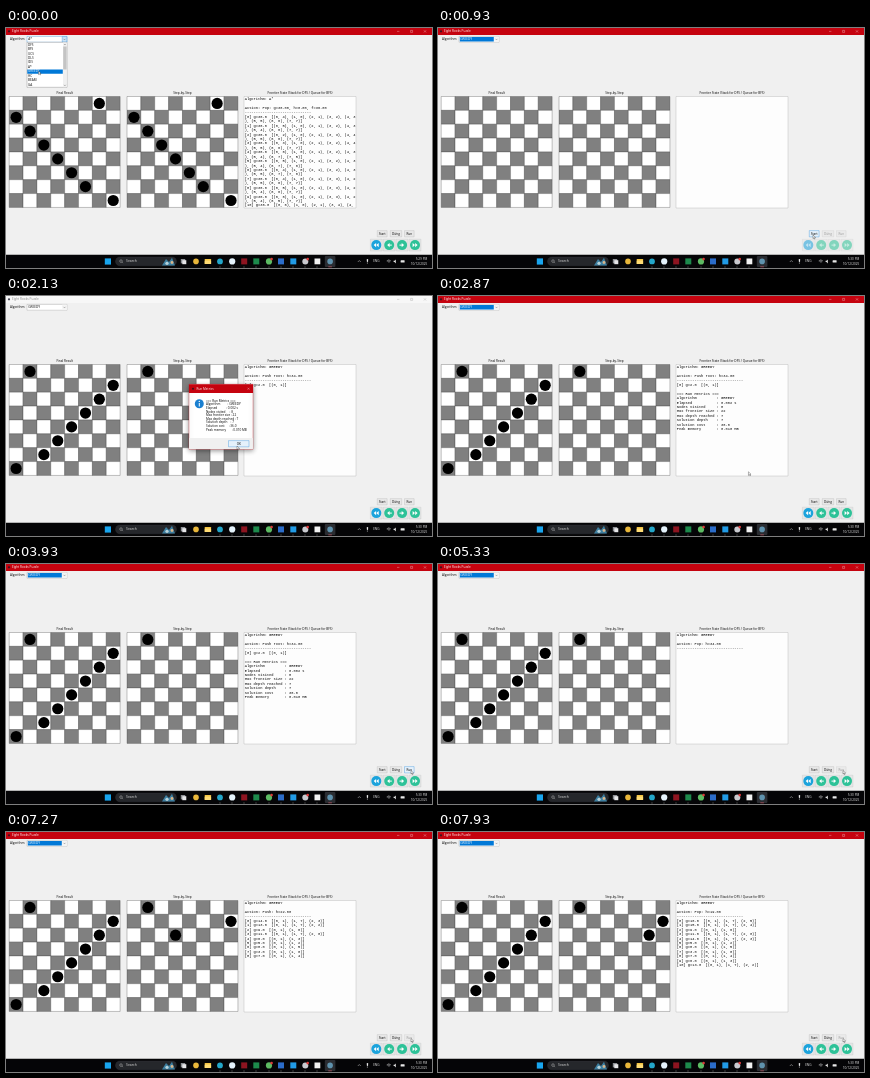
These frames come from a looping animation (426x240 px, 8 s). An HTML page with a canvas:

```html
<!DOCTYPE html>
<html lang="en">
<head>
<meta charset="utf-8">
<title>Eight Rooks Puzzle</title>
<style>
html, body { margin: 0; width: 100%; height: 100%; overflow: hidden; background: #f0f0f0; }
canvas { display: block; width: 426px; height: 240px; }
</style>
</head>
<body>
<canvas id="stage"></canvas>
<script>
const W = 426, H = 240, LOOP = 8000, UNIT = W / 1920;
const SANS = '"Open Sans", "Noto Sans", sans-serif';
const MONO = '"Liberation Mono", monospace';
const RED = '#c5030f', BLUE = '#0078d7', GREY = '#808080', FACE = '#f0f0f0';
const CELL = 62.5 * UNIT, BOARD_Y = 68.5;

// Moments at which the screen changes, in ms
const SELECT = 170, MINUTE = 500, START = 1130, CLOSE = 2370, RUN = 5235, STEP = 174;

const canvas = document.getElementById('stage');
const ratio = window.devicePixelRatio || 1;
canvas.width = W * ratio;
canvas.height = H * ratio;
const ctx = canvas.getContext('2d');

// ---------- drawing helpers (stage pixels; font sizes in desktop pixels) ----------
function rect(x, y, w, h, fill, stroke, radius = 0) {
  ctx.beginPath();
  ctx.roundRect(x, y, w, h, radius);
  if (fill) { ctx.fillStyle = fill; ctx.fill(); }
  if (stroke) { ctx.strokeStyle = stroke; ctx.lineWidth = 0.3; ctx.stroke(); }
}
function disc(x, y, r, fill) {
  ctx.beginPath();
  ctx.arc(x, y, r, 0, 7);
  ctx.fillStyle = fill;
  ctx.fill();
}
function poly(points, fill) {
  ctx.beginPath();
  points.forEach(([x, y]) => ctx.lineTo(x, y));
  ctx.closePath();
  ctx.fillStyle = fill;
  ctx.fill();
}
function line(points, color, width = 0.4) {
  ctx.beginPath();
  points.forEach(([x, y], i) => i ? ctx.lineTo(x, y) : ctx.moveTo(x, y));
  ctx.strokeStyle = color;
  ctx.lineWidth = width;
  ctx.stroke();
}
function text(str, x, y, color = '#000', align = 'left', size = 14, family = SANS) {
  ctx.save();
  ctx.translate(x, y);
  ctx.scale(UNIT, UNIT);
  ctx.font = `${size}px ${family}`;
  ctx.textAlign = align;
  ctx.textBaseline = 'middle';
  ctx.fillStyle = color;
  ctx.fillText(str, 0, 0);
  ctx.restore();
}
function cross(x, y, r, color) {
  line([[x - r, y - r], [x + r, y + r]], color, 0.3);
  line([[x + r, y - r], [x - r, y + r]], color, 0.3);
}

// ---------- greedy search: a state is the list of columns, row by row ----------
const cost = cols => cols.reduce((sum, c) => sum + c + 1, 0);
const estimate = cols => 36 - cost(cols);
const describe = (cols, i) =>
  `[${i}] g=${cost(cols).toFixed(1)}  [${cols.map((c, r) => `(${r}, ${c})`).join(', ')}]`;

function push(heap, item) {
  let i = heap.push(item) - 1;
  while (i) {
    const up = (i - 1) >> 1;
    if (estimate(heap[up]) <= estimate(heap[i])) break;
    [heap[up], heap[i]] = [heap[i], heap[up]];
    i = up;
  }
}
function pop(heap) {
  const top = heap[0], last = heap.pop();
  if (!heap.length) return top;
  heap[0] = last;
  for (let i = 0, kid; (kid = 2 * i + 1) < heap.length; i = kid) {
    if (kid + 1 < heap.length && estimate(heap[kid + 1]) < estimate(heap[kid])) kid++;
    if (estimate(heap[i]) <= estimate(heap[kid])) break;
    [heap[i], heap[kid]] = [heap[kid], heap[i]];
  }
  return top;
}
function greedySteps(count) {
  const steps = [], heap = [[1]];
  const record = (verb, cols) => steps.push({
    cols,
    lines: report('GREEDY', `${verb}: h=${estimate(cols).toFixed(2)}`, heap)
  });
  while (steps.length < count) {
    const state = pop(heap);
    record('Pop', state);
    for (let c = 0; c < 8; c++) {
      if (state.includes(c)) continue;
      push(heap, [...state, c]);
      record('Push', [...state, c]);
    }
  }
  return steps;
}
function report(algorithm, action, frontier) {
  return [`Algorithm: ${algorithm}`, '', `Action: ${action}`, '-'.repeat(30),
    ...frontier.map(describe)].flatMap(s => s.match(/.{1,50}/g) || ['']);
}

const columns = str => [...str].map(Number);
const STAR_RESULT = columns('60123457'), GREEDY_RESULT = columns('17654320');
const STAR_LINES = report('A*', 'Pop: g=36.00, h=0.00, f=36.00',
  ['40123567', '50123467', '20134567', '30124567', '60123475', '50123476',
   '40123576', '40132567', '50132467', '60132457', '60142357'].map(columns));
const METRICS = ['=== Run Metrics ===', ...[
  ['Algorithm', 'GREEDY'], ['Elapsed', '0.002 s'], ['Nodes visited', '8'],
  ['Max frontier size', '22'], ['Max depth reached', '7'], ['Solution depth', '7'],
  ['Solution cost', '36.0'], ['Peak memory', '0.010 MB']
].map(([name, value]) => `${name.padEnd(18)}: ${value}`)];
const ROOT_LINES = report('GREEDY', 'Push root: h=34.00', [[1]]);
const STEPS = greedySteps(16);

function stateAt(t) {
  if (t < SELECT) return { result: STAR_RESULT, cols: STAR_RESULT, lines: STAR_LINES };
  if (t < START) return { result: [], cols: [], lines: [] };
  if (t < CLOSE) return { result: GREEDY_RESULT, cols: [1], lines: ROOT_LINES };
  if (t < RUN) return { result: GREEDY_RESULT, cols: [1], lines: [...ROOT_LINES, '', ...METRICS] };
  return { result: GREEDY_RESULT, ...STEPS[Math.floor((t - RUN) / STEP)] };
}

// ---------- window ----------
function drawTitleBar(active) {
  const ink = active ? '#fff' : '#888';
  rect(0, 0, W, 7, active ? RED : '#f7f7f7');
  disc(3, 3.3, 1.1, active ? '#3a1420' : '#445');
  text('Eight Rooks Puzzle', 6, 3.4, ink);
  line([[391, 3.4], [393.4, 3.4]], ink, 0.3);
  rect(404.6, 2.4, 2, 2, null, ink);
  cross(419, 3.4, 1.1, ink);
}

function drawCombo(value, focused, open) {
  text('Algorithm:', 4, 11.4);
  rect(21, 8.4, 40, 5.8, '#fff', open ? BLUE : '#888');
  if (focused) rect(21.8, 9, 34, 4.6, BLUE);
  text(value, 22.3, 11.4, focused ? '#fff' : '#000');
  rect(56.2, 8.6, 4.6, 5.4, open ? '#cce4f7' : '#f4f4f4', open ? BLUE : null);
  line([[57.5, 10.8], [58.5, 11.9], [59.5, 10.8]], '#444', 0.35);
}

function drawOptions() {
  rect(21, 14.3, 40, 45, '#fff', '#555');
  ['DFS', 'BFS', 'UCS', 'DLS', 'IDS', 'A*', 'GREEDY', 'HC', 'BEAM', 'GA'].forEach((name, i) => {
    const y = 16.8 + i * 4.47, hot = name === 'GREEDY';
    if (hot) rect(21.3, y - 2.2, 35.5, 4.4, BLUE);
    text(name, 22, y, hot ? '#fff' : '#000');
  });
  rect(57, 14.5, 3.8, 44.6, '#f0f0f0');
  rect(57.2, 18.5, 3.4, 23, '#c4c4c4');
  line([[58, 17], [58.9, 16], [59.8, 17]], '#555');
  line([[58, 56.8], [58.9, 57.8], [59.8, 56.8]], '#555');
}

function drawBoard(x, title, rooks) {
  text(title, x + CELL * 4, 65.3, '#000', 'center');
  for (let r = 0; r < 8; r++)
    for (let c = 0; c < 8; c++)
      rect(x + c * CELL, BOARD_Y + r * CELL, CELL, CELL, (r + c) % 2 ? GREY : '#fff', '#333');
  rooks.forEach((c, r) => disc(x + (c + 0.5) * CELL, BOARD_Y + (r + 0.5) * CELL, 5.6, '#000'));
}

function drawFrontier(lines) {
  text('Frontier State (Stack for DFS / Queue for BFS)', 294, 65.3, '#000', 'center');
  rect(238, 68.5, 112, 111.5, '#fdfdfd', '#999');
  lines.slice(0, 25).forEach((s, i) => text(s, 238.7, 71.2 + i * 4.43, '#000', 'left', 16.67, MONO));
}

function drawButtons(t) {
  const ready = t < SELECT || t >= START;
  const button = (label, x, w, enabled, hot) => {
    rect(x, 202.6, w, 6.3, hot ? '#e5f1fb' : enabled ? '#e8e8e8' : '#eaeaea',
      hot ? BLUE : enabled ? '#aaa' : '#c8c8c8');
    text(label, x + w / 2, 205.8, enabled ? '#000' : '#999', 'center');
  };
  button('Start', 371.3, 9.8, true, t > 850 && t < START);
  button('Dừng', 384.3, 11.4, ready);
  button('Run', 398.5, 9.6, ready && t < RUN, t > 3350 && t < RUN);

  ctx.globalAlpha = ready ? 1 : 0.55;
  [[370.3, -1, 2], [383.2, -1, 1], [396.1, 1, 1], [409, 1, 2]].forEach(([x, dir, arrows], i) => {
    rect(x - 5.9, 211.2, 11.8, 11.8, '#e4e6e6', '#bbb');
    disc(x, 217.1, 5, i ? '#2dc298' : '#1ba3dc');
    for (let k = 0; k < arrows; k++) {
      const tip = x + dir * (arrows === 2 ? k * 2.6 : 2);
      poly([[tip, 217.1], [tip - dir * 2.4, 215], [tip - dir * 2.4, 219.2]], '#fff');
    }
    if (arrows === 1) rect(x - (dir > 0 ? 2.6 : 0), 216.6, 2.6, 1, '#fff');
  });
  ctx.globalAlpha = 1;
}

function drawDialog() {
  ctx.save();
  ctx.shadowColor = 'rgba(0,0,0,.45)';
  ctx.shadowBlur = 5 * ratio;
  ctx.shadowOffsetY = 1.5 * ratio;
  rect(183, 88.3, 64, 65, '#fff', RED);
  ctx.restore();
  rect(183, 88.3, 64, 8.6, RED);
  disc(187, 92.7, 1, '#3a1420');
  text('Run Metrics', 190.5, 92.8, '#fff');
  cross(242.5, 92.7, 1, '#fff');
  disc(193.3, 107.8, 4.5, '#1a7fd0');
  rect(192.8, 107, 1, 3.5, '#fff');
  disc(193.3, 105.4, 0.65, '#fff');
  METRICS.forEach((s, i) => text(s, 200, 105.1 + i * 3.58));
  rect(183.2, 142, 63.6, 11.1, FACE);
  rect(222.5, 144.6, 20.5, 6.2, '#e5f1fb', BLUE);
  text('OK', 232.8, 147.8, '#000', 'center');
}

// ---------- taskbar ----------
function drawTaskbar(t) {
  const y = 233.4;
  rect(0, 226.7, W, 13.3, '#050507');
  rect(98.8, y - 3, 6.2, 6.2, '#18a5ee');

  rect(109.5, 229, 61, 8.8, '#25272b', '#3a3c40', 4.4);
  ctx.beginPath();
  ctx.arc(115, y - 0.3, 1.3, 0, 7);
  ctx.strokeStyle = '#ddd';
  ctx.lineWidth = 0.4;
  ctx.stroke();
  line([[116, y + 0.7], [117, y + 1.7]], '#ddd');
  text('Search', 120, y, '#ddd', 'left', 15.5);
  poly([[156, 237.4], [160, 231], [163, 234], [166, 229.8], [169, 237.4]], '#3d7fa0');
  disc(161, 235.3, 1.6, '#b9d3da');
  disc(166, 234.5, 1.4, '#d9b68c');

  rect(174.8, y - 2.4, 4.4, 4.4, '#8c8f94');
  rect(176.3, y - 1.2, 4, 4, '#e6e6e8');
  disc(190, y, 2.8, '#e9b73a');
  rect(198.7, y - 2.5, 6.4, 5.2, '#f5c542', null, 0.5);
  rect(198.7, y - 1, 6.4, 3.7, '#ffdc75', null, 0.5);
  disc(214, y, 2.9, '#23a6c9');
  disc(226.2, y, 3.1, '#e4f2fb');
  rect(235.2, y - 3, 6, 6, '#8d1420');
  rect(247.3, y - 3, 6, 6, '#1d8a4c');
  disc(263, y, 3.1, '#5dbb63');
  rect(272, y - 3, 6, 6, '#2b6cc9');
  rect(284.3, y - 3, 6, 6, '#219be6');
  disc(299.3, y, 3, '#c9cacf');
  disc(265.6, y - 2.3, 1.3, '#dd3a3a');
  disc(301.7, y - 2.3, 1.3, '#dd3a3a');
  rect(308.5, y - 2.9, 5.8, 5.8, '#f2f2f2');
  rect(318.8, 228, 10.6, 11, '#2a2c31', null, 1);
  disc(324.1, y, 2.8, '#5f92ad');
  [214, 226, 238, 250, 263, 275, 287, 299, 311].forEach(x => rect(x - 0.8, 238.7, 1.6, 0.5, '#888'));
  rect(322.3, 238.6, 3.6, 0.6, '#e06070');

  const ink = '#e8e8e8';
  line([[351.8, 234], [353.3, 232.5], [354.8, 234]], ink, 0.45);
  rect(360.8, 231, 1.3, 2.9, ink, null, 0.6);
  line([[361.4, 234.2], [361.4, 236]], ink);
  text('ENG', 370.3, y, ink, 'center');
  for (const r of [1, 2, 3]) {
    ctx.beginPath();
    ctx.arc(382.8, 235, r, -2.35, -0.8);
    ctx.strokeStyle = ink;
    ctx.lineWidth = 0.45;
    ctx.stroke();
  }
  poly([[387.6, 232.7], [388.5, 232.7], [389.8, 231.4], [389.8, 235.4], [388.5, 234.1], [387.6, 234.1]], ink);
  rect(394.6, 232.2, 4, 2.4, ink, null, 0.5);
  text(t < MINUTE ? '5:29 PM' : '5:30 PM', 421.3, 231.1, ink, 'right');
  text('10/12/2025', 421.3, 235.8, ink, 'right');
}

// ---------- pointer ----------
const TRAVEL = [[0, 32.5, 43], [170, 32.5, 43], [860, 375, 207], [1150, 375, 207],
  [2050, 231, 150], [2400, 231, 150], [3400, 405, 206.5], [LOOP, 405, 206.5]];

function drawPointer(t) {
  const i = TRAVEL.findIndex(([time]) => time > t);
  const [t0, x0, y0] = TRAVEL[i - 1], [t1, x1, y1] = TRAVEL[i];
  const p = (t - t0) / (t1 - t0), ease = p * p * (3 - 2 * p);
  const x = x0 + (x1 - x0) * ease, y = y0 + (y1 - y0) * ease;
  const arrow = [[0, 0], [0, 3.6], [0.9, 2.8], [1.5, 4.1], [2, 3.8], [1.5, 2.6], [2.6, 2.5]]
    .map(([dx, dy]) => [x + dx, y + dy]);
  poly(arrow, '#fff');
  line([...arrow, arrow[0]], '#000', 0.3);
}

function draw(t) {
  const state = stateAt(t), open = t < SELECT, dialog = t >= START && t < CLOSE;
  ctx.setTransform(ratio, 0, 0, ratio, 0, 0);
  rect(0, 0, W, H, FACE);
  drawTitleBar(!dialog);
  drawCombo(open ? 'A*' : 'GREEDY', !open && !dialog, open);
  drawBoard(3.2, 'Final Result', state.result);
  drawBoard(121, 'Step-by-Step', state.cols);
  drawFrontier(state.lines);
  drawButtons(t);
  if (open) drawOptions();
  if (dialog) drawDialog();
  drawTaskbar(t);
  drawPointer(t);
}

const began = performance.now();
function tick() {
  draw((performance.now() - began) % LOOP);
  requestAnimationFrame(tick);
}
tick();
</script>
</body>
</html>
```
